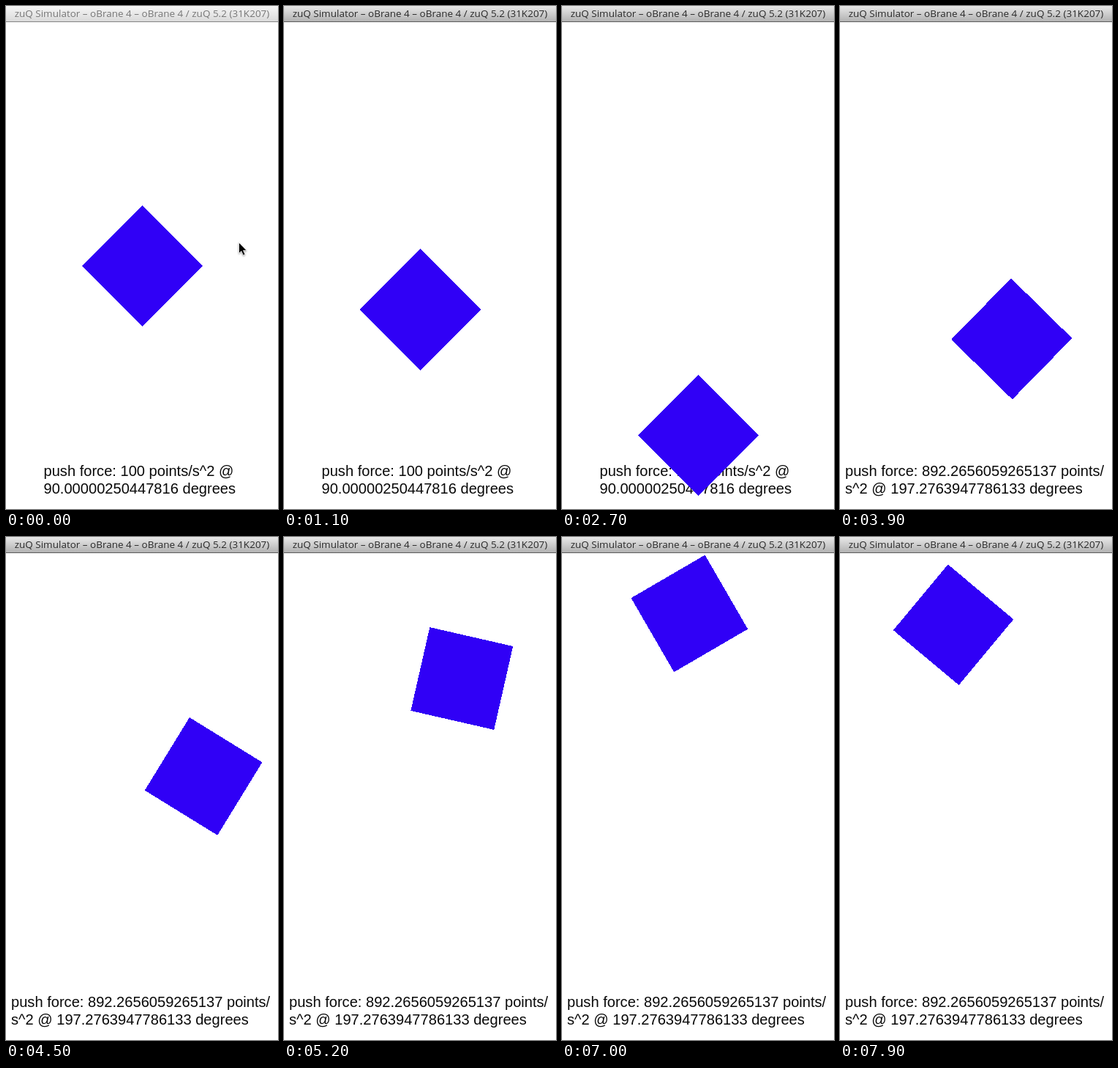
An HTML page that plays this animation: 372x686 px, repeating every 8 s.

```html
<!DOCTYPE html>
<html>
<head>
<meta charset="utf-8">
<style>
  html, body { margin: 0; width: 100%; height: 100%; overflow: hidden; background: #fff; }
  svg { display: block; width: 372px; height: 686px; }
  #title { font: 13.5px "Open Sans", "Noto Sans", sans-serif; }
  #label { font: 20.1px "Liberation Sans", Arial, sans-serif; fill: #0a0a0a; }
</style>
</head>
<body>
<svg viewBox="0 0 372 686">
  <defs>
    <linearGradient id="idle" x2="0" y2="1">
      <stop stop-color="#f6f6f6"/><stop offset="1" stop-color="#dadada"/>
    </linearGradient>
    <linearGradient id="active" x2="0" y2="1">
      <stop stop-color="#e8e8e8"/><stop offset="1" stop-color="#b2b2b2"/>
    </linearGradient>
  </defs>
  <rect id="bar" width="372" height="21"/>
  <rect id="line" y="21" width="372" height="1"/>
  <text id="title" x="186" y="15" text-anchor="middle">zuQ Simulator – oBrane 4 – oBrane 4 / zuQ 5.2 (31K207)</text>
  <g id="label"><text y="640.5"></text><text y="664.5"></text></g>
  <rect id="box" x="-58.4" y="-58.4" width="116.8" height="116.8" fill="#3000f6" shape-rendering="crispEdges"/>
  <path id="cursor" d="M318.5 322.5v15l3.3-3.2 2.6 5.6 2.6-1.1-2.5-5.4h4.6z" stroke="#fff" stroke-width=".8"
    style="filter: drop-shadow(0 1px 1px #0006)"/>
</svg>
<script>
const $ = id => document.getElementById(id);
const LOOP = 8, STEP = 0.1;
const FLOOR = 603, LANDING = 2.83, HOP = 0.3, TAP = 3.33;
const pushes = [
  { left: 51.5, lines: ['push force: 100 points/s^2 @', '90.00000250447816 degrees'] },
  { left: 7, lines: ['push force: 892.2656059265137 points/', 's^2 @ 197.2763947786133 degrees'] }
];

// Each impact sets a new constant velocity (px/s) and spin (deg/s)
const impacts = [
  { at: TAP, vx: -517, vy: -205, spin: 0 },
  { at: 3.53, vx: 410, vy: -292, spin: -1.6 },    // left wall
  { at: 4.03, vx: -38.3, vy: -190.6, spin: -26.8 }, // right wall
  { at: 5.78, vx: -38.3, vy: 18, spin: -22.5 },   // ceiling
  { at: 7, vx: -21.4, vy: 17, spin: -22.2 }       // corner on the ceiling
];

function pose(t) {
  let x = 186.5, y = 354.5 + 32.5 * t + 19.65 * t * t, angle = 45;
  if (t > LANDING) {
    const u = Math.min((t - LANDING) / HOP, 1);
    y = FLOOR - 24 * u * (1 - u);
  }
  impacts.forEach(({ at, vx, vy, spin }, i) => {
    const end = impacts[i + 1]?.at ?? LOOP;
    const dt = Math.max(0, Math.min(t, end) - at);
    x += vx * dt;
    y += vy * dt;
    angle += spin * dt;
  });
  return { x, y, angle };
}

function draw(ms) {
  const t = Math.floor(ms / 1000 % LOOP / STEP + 1e-6) * STEP;
  const { x, y, angle } = pose(t);
  $('box').setAttribute('transform', `translate(${x} ${y}) rotate(${angle})`);

  const active = t > 0;
  $('bar').setAttribute('fill', active ? 'url(#active)' : 'url(#idle)');
  $('line').setAttribute('fill', active ? '#5c5c5c' : '#858585');
  $('title').setAttribute('fill', active ? '#2a2a2a' : '#777');
  $('cursor').style.display = active ? 'none' : '';

  const { left, lines } = pushes[t > TAP ? 1 : 0];
  [...$('label').children].forEach((el, i) => {
    el.setAttribute('x', left);
    el.textContent = lines[i];
  });
}

let start;
function tick(now) {
  start ??= now;
  draw(now - start);
  requestAnimationFrame(tick);
}
draw(0);
requestAnimationFrame(tick);
</script>
</body>
</html>
```
